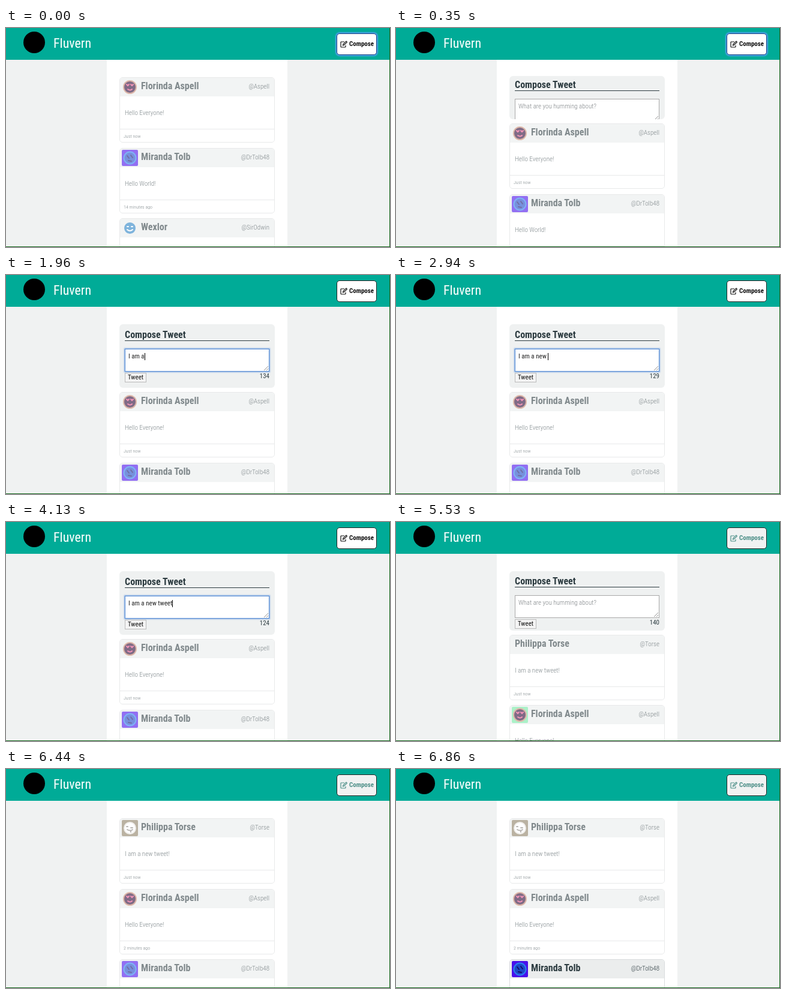
An HTML page that plays this animation: 640x365 px, repeating every 6930 ms.

```html
<!DOCTYPE html>
<html lang="en">
<head>
<meta charset="utf-8">
<title>Compose a post</title>
<style>
html, body { margin: 0; width: 100%; height: 100%; overflow: hidden; }
body {
  position: relative; background: #f0f2f2; color: #2c3b40;
  font-family: "Roboto Condensed", Roboto, sans-serif; font-stretch: 75%;
}
body * { position: absolute; box-sizing: border-box; white-space: pre; }
.bar { left: 0; top: 0; width: 100%; height: 53px; background: #00ab97; z-index: 2; }
.logo { left: 29px; top: 6px; width: 36px; height: 36px; border-radius: 50%; background: #000; }
.brand { left: 79px; top: 13px; font-size: 22px; line-height: 26px; color: #fff; }
.compose {
  left: 551px; top: 9px; width: 67px; height: 36px; border: 1px solid #222; border-radius: 5px;
  background: #f0f2f2; color: #4d8f88; font-weight: 700; font-size: 11px; line-height: 34px;
}
.compose.lit { background: #fff; color: #111; }
.compose.ring { border-color: #17407c; box-shadow: 0 0 2px 2px #4a9fe8; }
.compose span { left: 20px; top: 0; }
.compose svg { left: 5px; top: 11px; }
.column { left: 168px; top: 52px; width: 301px; height: 313px; background: #fff; }
.edge { left: 0; top: 0; width: 100%; height: 365px; border: solid #17691f; border-width: 0 1px 1px 0; z-index: 3; }

.panel {
  left: 189px; width: 259px; top: calc(82px - 7px * var(--q)); height: calc(106px * (1 - var(--q)));
  background: #eff1f1; border-radius: 6px; overflow: hidden;
}
.form { left: 9px; top: calc(-8px * var(--q)); width: 241px; height: 106px; }
.title { left: 0; top: 8px; width: 100%; height: 20px; font-weight: 700; font-size: 16px; line-height: 20px; border-bottom: 1px solid #2c3b40; }
.field { left: 0; top: 41px; width: 241px; height: 38px; border: 1px solid #a9a9a9; background: #fff; }
.field.focus { border-color: #5b8fd6; box-shadow: 0 0 2px 1px #7fa9e0; }
.typed { left: 5px; top: 5px; font-size: 11px; line-height: 14px; color: #222; }
.typed.empty { color: #7c8184; font-weight: 300; }
.caret { left: 100%; top: 1px; width: 1px; height: 12px; background: #000; }
.grip { right: 1px; bottom: 1px; }
.send { left: 0; top: 81px; width: 36px; height: 16px; border: 1px solid #bbb; background: #f4f4f4; color: #111; font-size: 11px; line-height: 14px; text-align: center; }
.count { right: 0; top: 80px; font-size: 11px; line-height: 14px; }

.list { left: 189px; top: calc(195px - 113px * var(--q)); width: 259px; }
.card { width: 259px; height: 109px; border: 1px solid #d9dcdd; border-radius: 5px; background: #fff; opacity: .6; overflow: hidden; }
.card.hover { opacity: 1; }
.head { left: 0; top: 0; width: 100%; height: 31px; background: #ebeded; }
.name { left: 35px; top: 4px; font-weight: 700; font-size: 16px; line-height: 20px; }
.bare .name { left: 8px; }
.bare svg { display: none; }
.handle { right: 8px; top: 8px; font-size: 11px; line-height: 14px; font-weight: 300; }
.text { left: 8px; top: 52px; font-size: 11px; line-height: 14px; font-weight: 300; }
.foot { left: 0; top: 85px; width: 100%; height: 23px; border-top: 1px solid #d9dcdd; }
.foot span { left: 6px; top: 6px; font-size: 8px; line-height: 12px; font-weight: 300; }
.card svg { left: 3px; top: 2px; }
</style>
</head>
<body>
<div class="column"></div>
<div class="list"></div>
<div class="panel">
  <div class="form">
    <div class="title">Compose Tweet</div>
    <div class="field">
      <div class="typed"></div>
      <svg class="grip" width="7" height="7" stroke="#777" stroke-width=".8"><path d="M0 7L7 0M4 7L7 4"/></svg>
    </div>
    <div class="send">Tweet</div>
    <div class="count"></div>
  </div>
</div>
<div class="bar">
  <div class="logo"></div>
  <div class="brand">Fluvern</div>
  <div class="compose">
    <svg width="12" height="12" viewBox="0 0 12 12" fill="none" stroke="currentColor" stroke-width="1.2">
      <path d="M7 2H2Q1 2 1 3V10Q1 11 2 11H8Q9 11 9 10V8M4.5 8L5 6L10 1L11.5 2.5L6.5 7.5Z"/>
    </svg>
    <span>Compose</span>
  </div>
</div>
<div class="edge"></div>
<script>
const LOOP = 6930, LIMIT = 140;
const MESSAGE = 'I am a new tweet!';
const KEYS = [1050, 1260, 1400, 1540, 1750, 1890, 2100, 2240, 2450, 2660, 2940, 3150, 3290, 3430, 3710, 4130, 4340];
const OPEN = 70, CLOSE = 5457, SLIDE = 454;
const FOCUS = 560, LEAVE = 4480, BLUR = 4760, POSTED = 5390, LOADED = 5600, HOVER = 6700;

const $ = s => document.querySelector(s);
const list = $('.list'), compose = $('.compose'), field = $('.field'), typed = $('.typed'), count = $('.count');

// Avatars: square tile, round face, and strokes for the features.
const avatar = (tile, rim, face, ink, r, features) =>
  `<svg width="27" height="27"><rect class="tile" width="27" height="27" rx="2" fill="${tile}"/>
   <circle cx="13.5" cy="13.5" r="${r}" fill="${face}" stroke="${rim}" stroke-width="2"/>
   <path d="${features}" fill="none" stroke="${ink}" stroke-width="2" stroke-linecap="round"/></svg>`;

const people = {
  torse: ['Philippa Torse', '@Torse', 'I am a new tweet!',
    avatar('#8d8065', '#e8e6e0', '#fff', '#8a8782', 9.5, 'M8 11h2M15 13h3M9 16q5 3 9 0M15 18v2')],
  aspell: ['Florinda Aspell', '@Aspell', 'Hello Everyone!',
    avatar('none', '#c98a72', '#2c0a36', '#f0508a', 10.5, 'M8 9l2 2 2-2M15 9l2 2 2-2M10 17q4 3 7 0')],
  tolb: ['Miranda Tolb', '@DrTolb48', 'Hello World!',
    avatar('#4a10ea', '#2a80f0', '#1c48c8', '#12106a', 10, 'M9 10l3 4M15 9l3 4M11 18l5 1')],
  wexlor: ['Wexlor', '@SirOdwin', 'Good morning!',
    avatar('none', '#2b83c6', '#2b83c6', '#fff', 8.5, 'M9 11h2M16 11h2M9 16q4.5 4 9 0')]
};

const makeCard = ([id, age], i) => {
  const [name, handle, text, face] = people[id];
  return `<div class="card" id="${id}" style="top:${i * 117.5}px">
    <div class="head">${face}<div class="name">${name}</div><div class="handle">${handle}</div></div>
    <div class="text">${text}</div><div class="foot"><span>${age}</span></div></div>`;
};
const before = [['aspell', 'Just now'], ['tolb', '14 minutes ago'], ['wexlor', '20 minutes ago']].map(makeCard).join('');
const after = [['torse', 'Just now'], ['aspell', '2 minutes ago'], ['tolb', '16 minutes ago']].map(makeCard).join('');

const swing = (t, start) => {
  const p = Math.min(1, Math.max(0, (t - start) / SLIDE));
  return .5 - Math.cos(Math.PI * p) / 2;
};

let shown = null;
function render(t) {
  const posted = t >= POSTED, focused = t >= FOCUS && t < BLUR;
  document.body.style.setProperty('--q', 1 - swing(t, OPEN) + swing(t, CLOSE));

  compose.classList.toggle('lit', t < LEAVE);
  compose.classList.toggle('ring', t < FOCUS);
  field.classList.toggle('focus', focused);

  const n = posted ? 0 : KEYS.filter(k => k <= t).length;
  typed.classList.toggle('empty', !n);
  typed.textContent = n ? MESSAGE.slice(0, n) : 'What are you humming about?';
  if (focused && n) typed.insertAdjacentHTML('beforeend', '<i class="caret"></i>');
  count.textContent = LIMIT - n;

  if (shown !== posted) {
    list.innerHTML = posted ? after : before;
    shown = posted;
  }
  if (posted) {
    const loading = t < LOADED;
    $('#torse').classList.toggle('bare', loading);
    $('#aspell .tile').setAttribute('fill', loading ? '#74e8a4' : 'none');
  }
  $('#tolb').classList.toggle('hover', t >= HOVER);
}

const began = performance.now();
function tick() {
  render((performance.now() - began) % LOOP);
  requestAnimationFrame(tick);
}
tick();
</script>
</body>
</html>
```
